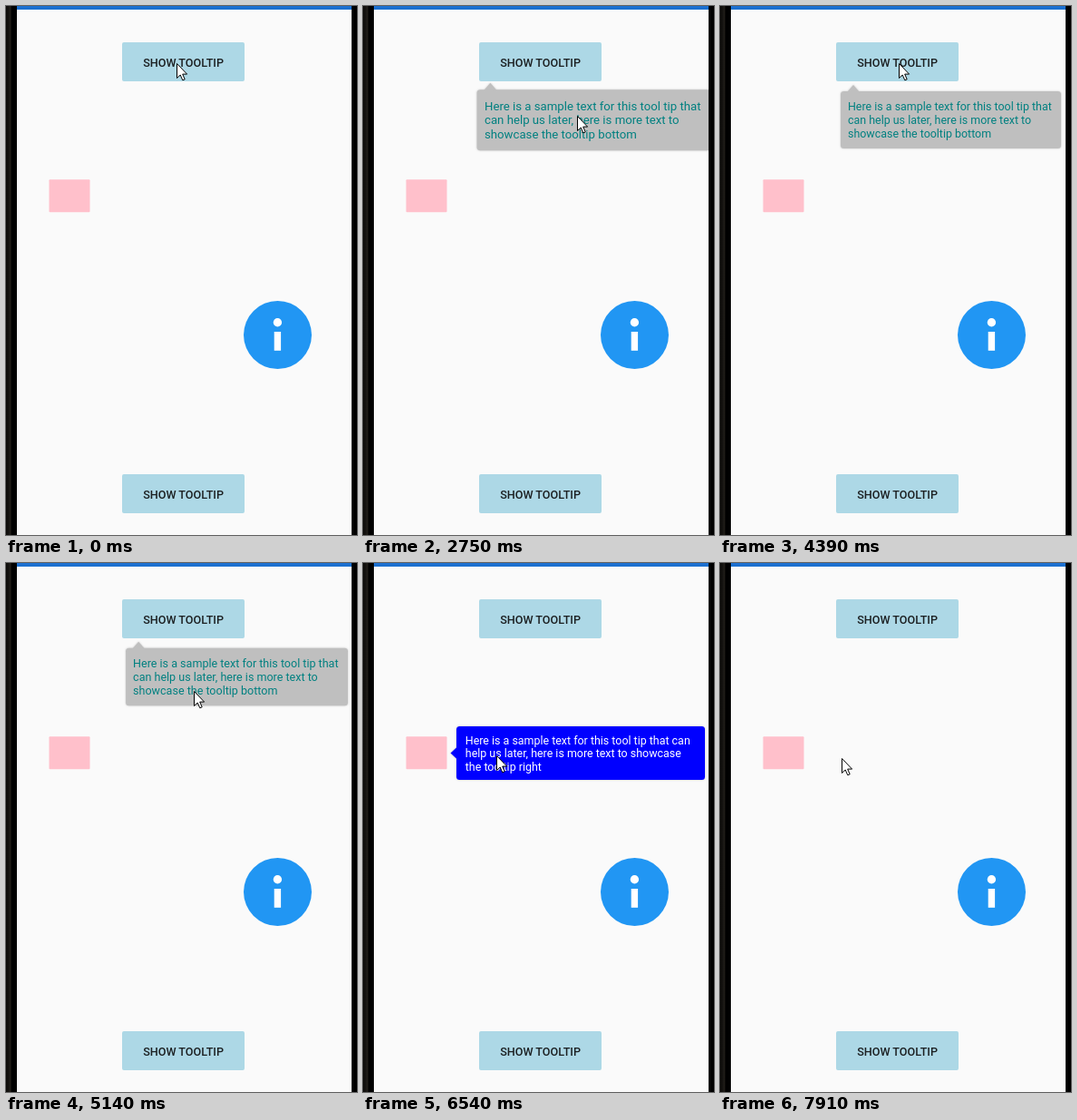
These frames come from a looping animation (387x583 px, 8 s). An HTML page:

```html
<!DOCTYPE html>
<html lang="en">
<head>
<meta charset="utf-8">
<title>Tooltip demo</title>
<style>
  html, body { margin: 0; width: 100%; height: 100%; overflow: hidden; background: #000; }
  svg { display: block; width: 387px; height: 583px; }
  text { font: 12.45px Roboto, "Open Sans", sans-serif; white-space: pre; }
  .label { font-weight: 500; font-size: 12.6px; text-anchor: middle; fill: #1c2022; }
  .tip { filter: drop-shadow(0 .5px 1px rgba(0, 0, 0, .2)); }
</style>
</head>
<body>
<svg viewBox="0 0 387 583">
  <defs>
    <linearGradient id="bezel">
      <stop offset="0" stop-color="#0b0a08"/>
      <stop offset=".3" stop-color="#181613"/>
      <stop offset=".42" stop-color="#24211b"/>
      <stop offset=".5" stop-color="#000"/>
    </linearGradient>
    <clipPath id="buttonClip"><rect x="128" y="40" width="135" height="43" rx="2"/></clipPath>
  </defs>

  <rect x="12" width="369" height="583" fill="#fafafa"/>
  <rect x="12" width="369" height="4" fill="#1c70d0"/>

  <rect x="128" y="40" width="135" height="43" rx="2" fill="#add8e6"/>
  <g id="ripple" clip-path="url(#buttonClip)">
    <rect x="128" y="40" width="135" height="43" fill="#a2d1e1"/>
    <circle id="wave" cx="196" cy="62" fill="#92c8db"/>
  </g>
  <text class="label" x="195.6" y="66.5">SHOW TOOLTIP</text>

  <rect x="128" y="516" width="135" height="43" rx="2" fill="#add8e6"/>
  <text class="label" x="195.6" y="542.5">SHOW TOOLTIP</text>

  <rect x="47.5" y="191.3" width="45" height="36" rx="1" fill="#ffc0cb"/>

  <circle cx="299.5" cy="362.5" r="37.5" fill="#2196f3"/>
  <g fill="#fff">
    <circle cx="299.4" cy="348.8" r="4.7"/>
    <rect x="295.7" y="359" width="7.4" height="20.8"/>
  </g>

  <g id="below" class="tip">
    <path d="M140 95l7-8 7 8z" fill="#bfbfbf"/>
    <rect x="133" y="94" width="243" height="63" rx="3.5" fill="#bfbfbf"/>
    <g fill="#008080">
      <text x="141" y="115.3">Here is a sample text for this tool tip that</text>
      <text x="141" y="129.9">can help us later, here is more text to</text>
      <text x="141" y="144.5">showcase the tooltip bottom</text>
    </g>
  </g>

  <g id="beside" class="tip">
    <path d="M104 202.5l-7.5 7 7.5 7z" fill="#00f"/>
    <rect x="103" y="180" width="274" height="59" rx="3.5" fill="#00f"/>
    <g fill="#fff">
      <text x="112.8" y="199.6">Here is a sample text for this tool tip that can</text>
      <text x="112.8" y="214.2">help us later, here is more text to showcase</text>
      <text x="112.8" y="228.8">the tooltip right</text>
    </g>
  </g>

  <rect width="12" height="583" fill="url(#bezel)"/>
  <rect x="381" width="6" height="583" fill="#000"/>

  <path id="cursor" d="M.5.5v16l3.7-3.5 2.6 5.8 2.4-1-2.5-5.7h4.9z" fill="#fff" stroke="#000" stroke-linejoin="round"/>
</svg>

<script>
const LOOP = 8000, STEP = 120, IN = 380, OUT = 420;
const $ = id => document.getElementById(id);

const home = [188, 63];
const moves = [
  { from: 900, to: 1160, at: [197, 70] },
  { from: 1400, to: 1910, at: [185, 56] },
  { from: 1910, to: 2200, at: [236, 121] },
  { from: 2750, to: 3730, at: [197, 63] },
  { from: 4540, to: 5140, at: [207, 141] },
  { from: 5380, to: 5780, at: [80, 210] },
  { from: 6420, to: 6540, at: [147, 212] },
  { from: 6540, to: 7150, at: [195, 209] },
  { from: 7650, to: 7910, at: [134, 215] }
];

const presses = [{ from: 660, to: 1250 }, { from: 3980, to: 4090 }];

const tips = [
  { el: $("below"), cx: 254.5, cy: 122, open: 785, close: 2698 },
  { el: $("below"), cx: 254.5, cy: 122, open: 3933, close: 5124 },
  { el: $("beside"), cx: 236.7, cy: 209.5, open: 6093, close: 7454 }
];

// The screen refreshes in even steps, restarted by every pointer action.
const actions = [0, ...[...moves, ...presses].flatMap(a => [a.from, a.to])];

function refreshTime(now) {
  const last = Math.max(...actions.filter(a => a <= now));
  return now - (now - last) % STEP;
}

const overshoot = p => {
  const u = p - 1;
  return u * u * (3 * u + 2) + 1;
};

const anticipateOvershoot = p => {
  const x = 2 * p, u = x - 2;
  return p < .5 ? x * x * (4 * x - 3) / 2 : u * u * (4 * u + 3) / 2 + 1;
};

function drawTip(t) {
  for (const { el } of tips) el.style.display = "none";
  const tip = tips.find(({ open, close }) => t > open && t < close + OUT);
  if (!tip) return;
  const { el, cx, cy, open, close } = tip;
  const s = t < close
    ? overshoot(Math.min(1, (t - open) / IN))
    : 1 - anticipateOvershoot((t - close) / OUT);
  if (s <= 0) return;
  el.style.display = "";
  el.style.opacity = Math.min(1, s);
  el.setAttribute("transform", `translate(${cx} ${cy}) scale(${s}) translate(${-cx} ${-cy})`);
}

function drawRipple(t) {
  const press = presses.find(({ from, to }) => t >= from && t < to);
  $("ripple").style.display = press ? "" : "none";
  if (!press) return;
  const age = t - press.from;
  $("wave").setAttribute("r", 28 + age * .24);
  $("wave").style.opacity = Math.max(0, 1 - age / STEP / 4);
}

function drawCursor(t) {
  let pos = home;
  for (const { from, to, at } of moves) {
    const p = Math.min(1, Math.max(0, (t - from) / (to - from)));
    pos = pos.map((v, i) => v + (at[i] - v) * p);
  }
  $("cursor").setAttribute("transform", `translate(${pos.map(Math.round)})`);
}

const start = performance.now();
function frame() {
  const t = refreshTime((performance.now() - start) % LOOP);
  drawTip(t);
  drawRipple(t);
  drawCursor(t);
  requestAnimationFrame(frame);
}
frame();
</script>
</body>
</html>
```
